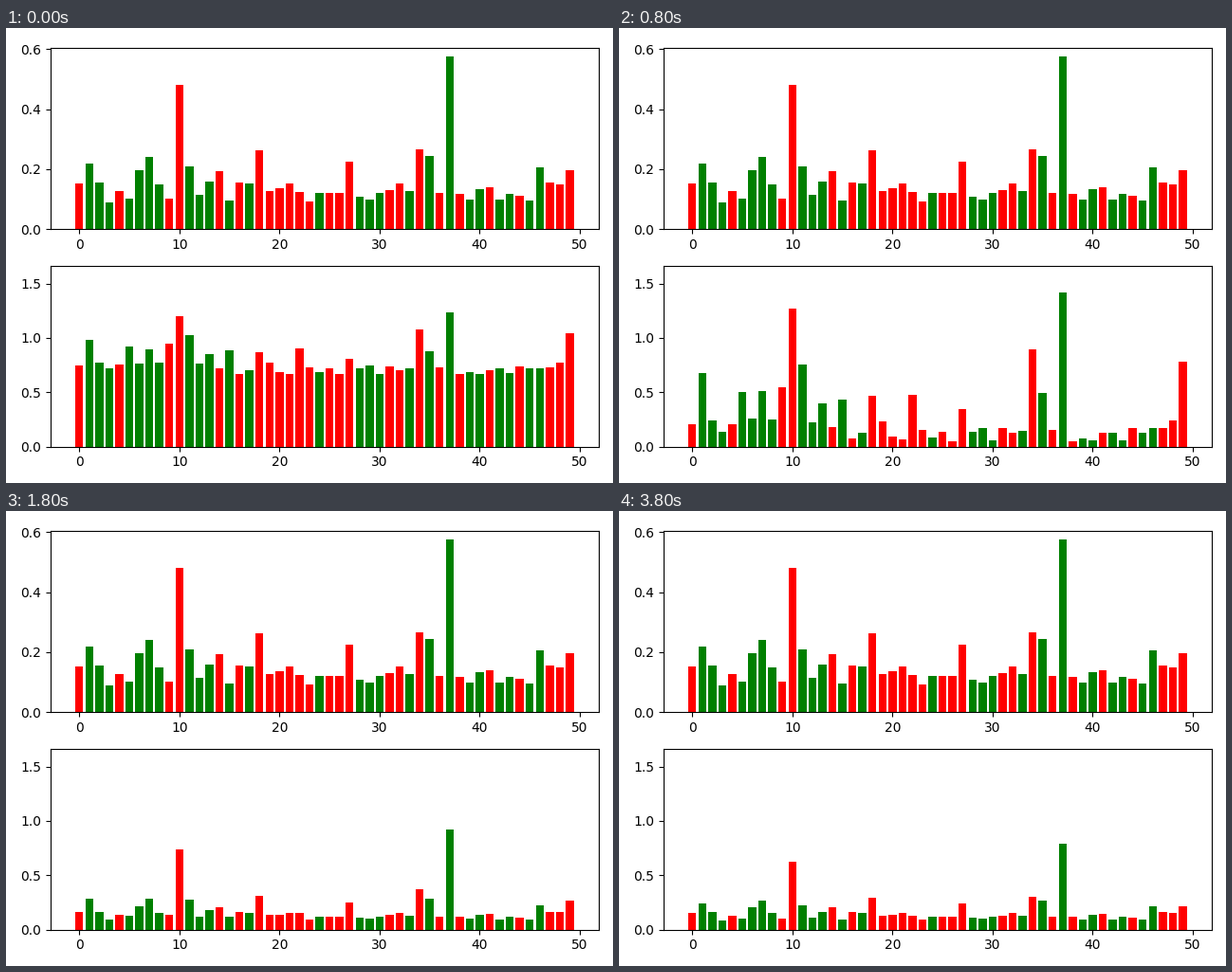
Write a matplotlib script that moves like this. It is 640 px wide and 480 px high and loops after 4000 ms.

```python
import numpy as np
import matplotlib.pyplot as plt
from matplotlib.animation import FuncAnimation

N = 50
FRAMES = 20
TURN = 5      # step at which the swing gives way to a slow decay
DECAY = 3.8   # decay time in steps

RED = {0, 4, 9, 10, 14, 16, *range(18, 24), 25, 26, 27, 31, 32, 34,
       36, 38, 41, 44, 47, 48, 49}

# Tall bars: upper height, height of the swing in the lower chart.
PEAKS = {1: (0.218, 0.89), 5: (0.102, 0.73), 6: (0.196, 0.325),
         7: (0.24, 0.655), 9: (0.101, 0.795), 10: (0.48, 1.445),
         11: (0.208, 0.995), 13: (0.158, 0.55), 14: (0.193, 0.21),
         15: (0.095, 0.645), 18: (0.262, 0.585), 22: (0.124, 0.68),
         27: (0.224, 0.44), 34: (0.265, 1.14), 35: (0.243, 0.625),
         37: (0.575, 1.54), 46: (0.205, 0.2), 49: (0.196, 1.045)}

rng = np.random.default_rng(4)
fixed = rng.uniform(0.083, 0.158, N)
swing = rng.uniform(0.05, 0.36, N)
for i, (height, reach) in PEAKS.items():
    fixed[i], swing[i] = height, reach

start = 0.64 + 0.385 * swing
rest = fixed * (0.9 + 0.8 * fixed)
turn = rest + 0.17 * swing ** 2
curve = np.polyfit([0, 3, TURN], [start, swing, turn], 2)


def heights(step):
    if step <= TURN:
        return np.abs(curve[0] * step ** 2 + curve[1] * step + curve[2])
    return rest + (turn - rest) * np.exp((TURN - step) / DECAY)


W, H = 640, 480
LEFT, RIGHT, BOTTOM, HEIGHT = 46.72, 625, 38.28, 191.15
fig = plt.figure(figsize=(W / 100, H / 100), dpi=100)
colors = ["red" if i in RED else "green" for i in range(N)]


def chart(bottom, values, top):
    ax = fig.add_axes([LEFT / W, bottom / H, (RIGHT - LEFT) / W, HEIGHT / H])
    bars = ax.bar(range(N), values, color=colors)
    ax.set_ylim(0, top)
    return bars


chart(2 * BOTTOM + HEIGHT, fixed, 1.05 * fixed.max())
bars = chart(BOTTOM, start, 1.665)


def update(step):
    for bar, height in zip(bars, heights(step)):
        bar.set_height(height)
    return list(bars)


anim = FuncAnimation(fig, update, frames=FRAMES, interval=200,
                     repeat=True, repeat_delay=0)
plt.show()
```
